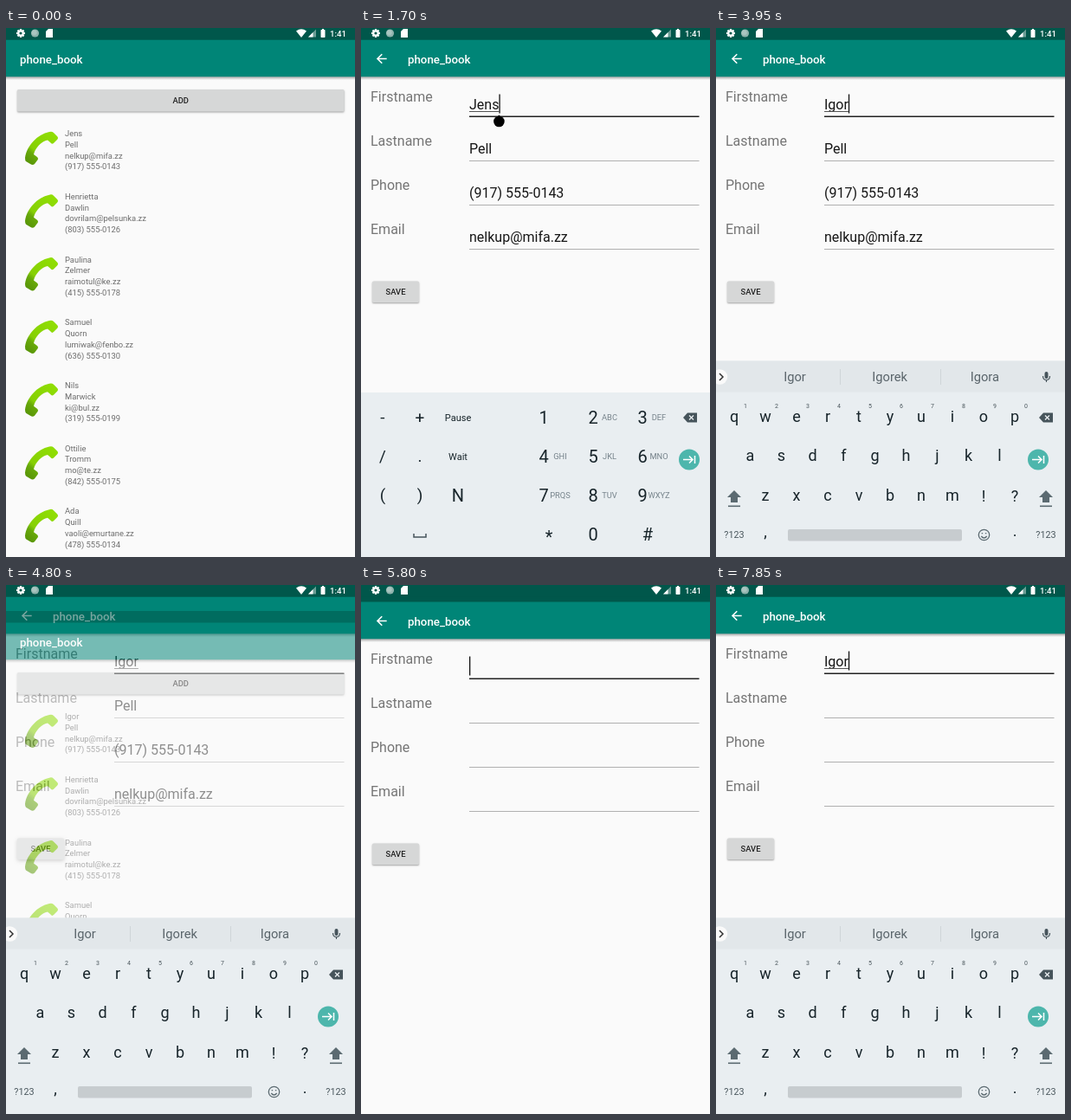
Write an HTML page with a canvas that moves like this. It is 403 by 611 pixels and loops after 8 s.

```html
<!DOCTYPE html>
<html lang="en">
<head>
<meta charset="utf-8">
<title>Phone book</title>
<style>
  html, body { margin: 0; width: 100%; height: 100%; overflow: hidden; background: #fafafa; }
  canvas { display: block; }
</style>
</head>
<body>
<canvas id="stage" width="403" height="611"></canvas>
<script>
const W = 403, H = 611, LOOP = 8000;
const stage = document.getElementById('stage').getContext('2d');
const layerCanvas = Object.assign(document.createElement('canvas'), { width: W, height: H });
const layer = layerCanvas.getContext('2d');
let c = stage;

const contacts = [
  ['Jens', 'Pell', 'nelkup@mifa.zz', '(917) 555-0143'],
  ['Henrietta', 'Dawlin', 'dovrilam@pelsunka.zz', '(803) 555-0126'],
  ['Paulina', 'Zelmer', 'raimotul@ke.zz', '(415) 555-0178'],
  ['Samuel', 'Quorn', 'lumiwak@fenbo.zz', '(636) 555-0130'],
  ['Nils', 'Marwick', 'ki@bul.zz', '(319) 555-0199'],
  ['Ottilie', 'Tromm', 'mo@te.zz', '(842) 555-0175'],
  ['Ada', 'Quill', 'vaoli@emurtane.zz', '(478) 555-0134']
];

// [start, text of the first field]
const edits = [
  [0, 'Jens'], [1950, 'Jen'], [2050, 'Je'], [2200, 'J'], [2350, ''],
  [2850, 'I'], [3650, 'Ig'], [3850, 'Igo'], [3950, 'Igor'],
  [5550, ''], [6650, 'I'], [6950, 'Ig'], [7350, 'Igo'], [7800, 'Igor']
];
const suggestions = {
  '': ['thanks', 'I', 'we'],
  Jens: ['Jens', 'Jensen', 'Jenseny'], Jen: ['Jen', 'Jens', 'Jenny'],
  Je: ['Je', 'Jet', 'Jeans'], J: ['J', 'Just', 'July'],
  I: ['I', 'in', 'is'], Ig: ['Ig', 'I', 'it'], Igo: ['Igo', 'I', 'it'],
  Igor: ['Igor', 'Igorek', 'Igora']
};
const caretOff = [[1450, 1600], [2600, 2800], [3050, 3300], [3500, 3650], [4150, 4400],
  [4600, 5000], [6350, 6550], [6850, 6950], [7150, 7350], [7600, 7800]];

const clamp = v => Math.max(0, Math.min(1, v));
const ease = (t, from, to) => 1 - (1 - clamp((t - from) / (to - from))) ** 2;
const within = (t, [a, b]) => t >= a && t < b;

function rect(x, y, w, h, color, r = 0) {
  c.fillStyle = color;
  c.beginPath();
  c.roundRect(x, y, w, h, r);
  c.fill();
}
function disc(x, y, r, color) {
  c.fillStyle = color;
  c.beginPath();
  c.arc(x, y, r, 0, 7);
  c.fill();
}
function text(s, x, y, size, color, align = 'left', weight = 400) {
  c.font = `${weight} ${size}px Roboto, sans-serif`;
  c.textAlign = align;
  c.fillStyle = color;
  c.fillText(s, x, y);
}
const key = (s, x, y, size = 18, color = '#17242a') => text(s, x, y + size * 0.33, size, color, 'center');
function shape(d, x, y, color, stroke = 0) {
  c.save();
  c.translate(x, y);
  const path = new Path2D(d);
  c.fillStyle = c.strokeStyle = color;
  c.lineWidth = stroke;
  stroke ? c.stroke(path) : c.fill(path);
  c.restore();
}

function button(label, x, y, w, h, pressed) {
  c.save();
  c.shadowColor = 'rgba(0,0,0,.35)';
  c.shadowBlur = pressed ? 4 : 2;
  c.shadowOffsetY = pressed ? 1.5 : 1;
  rect(x, y, w, h, pressed ? '#d3d4d4' : '#d6d7d7', 1.5);
  c.restore();
  text(label, x + w / 2, y + h / 2 + 3.4, 9.4, '#212121', 'center', 500);
}

function appWindow(titleX) {
  rect(0, 0, W, H, '#fafafa');
  const shadow = c.createLinearGradient(0, 56, 0, 60);
  shadow.addColorStop(0, 'rgba(0,0,0,.35)');
  shadow.addColorStop(1, 'rgba(0,0,0,0)');
  rect(0, 56, W, 4, shadow);
  rect(0, 0, W, 14, '#00574b');
  rect(0, 13.5, W, 42.8, '#008577');
  text('phone_book', titleX, 40.5, 13.3, '#fff', 'left', 500);
}

function handset(x, y) {
  const green = c.createLinearGradient(4, 38, 32, 4);
  green.addColorStop(0, '#569207');
  green.addColorStop(0.28, '#68a90a');
  green.addColorStop(0.4, '#86d003');
  green.addColorStop(1, '#8fdd04');
  shape('M1 31C3 17 15 4 29 1Q32 0 34 2L38 6Q40 8 38 10L34 14Q32 16 30 13L27 10.5C20 12 13 19 11 27L15 30Q17 32 15 34L12 38Q10 40 7 38L2 35Q1 34 1 31Z', x, y, green);
}

function listScreen(firstName, pressed) {
  appWindow(16);
  button('ADD', 13, 71, 377.5, 25.5, pressed);
  contacts.forEach((contact, i) => {
    const y = i * 72.7;
    handset(21, 119 + y);
    contact.forEach((line, j) =>
      text(i || j ? line : firstName, 68, 125.2 + y + j * 12.75, 9.4, '#6c6c6c'));
  });
}

function formScreen({ values, focus, caretAtEnd, caret, underline, handle, pressed }) {
  appWindow(54);
  shape('M29.7 35.5H19.2M24.3 30.2L19 35.5L24.3 40.8', 0, 0, '#fff', 1.6);
  ['Firstname', 'Lastname', 'Phone', 'Email'].forEach((label, i) => {
    const y = i * 51.1, active = i === focus;
    text(label, 11, 85 + y, 16, '#757575');
    text(values[i], 125, 94 + y, 16, '#161616');
    const width = c.measureText(values[i]).width;
    if (active) rect(125, 101.5 + y, 265.5, 1.6, '#222');
    else rect(125, Math.round(102 + y), 265.5, 1, '#b0b0b0');
    if (!i && underline) rect(125, 96, width, 1, '#555');
    if (!active) return;
    const x = 125 + (caretAtEnd ? width : 0);
    if (caret) rect(x, 76.5 + y, 1.3, 22, '#111');
    if (handle) {
      disc(x, 108, 6.3, '#000');
      shape('M0 0L5.2 5H-5.2Z', x, 100.5, '#000');
    }
  });
  button('SAVE', 13, 292.5, 54, 24.5, pressed);
}

function statusIcons() {
  rect(0, 0, W, 13.5, '#00574b');
  for (let i = 0; i < 4; i++) {
    c.save();
    c.translate(17, 6);
    c.rotate(i * Math.PI / 4);
    rect(-1.1, -5, 2.2, 10, '#fff');
    c.restore();
  }
  disc(17, 6, 3.8, '#fff');
  disc(17, 6, 1.6, '#00574b');
  disc(33.5, 6, 4.6, '#8fb3ad');
  disc(32.7, 5.2, 3, '#a9c5c0');
  shape('M3 0H8V10H0V3Z', 46, 1, '#fff');
  shape('M0 2.5Q6 -2 12 2.5L6 10Z', 335, 1, '#fff');
  shape('M9 0V9H0Z', 349, 1.5, '#6b9d95');
  shape('M5.5 3.5V9H0Z', 349, 1.5, '#fff');
  rect(363.5, 2, 5, 9, '#fff', 0.8);
  rect(365, 1, 2, 2, '#fff');
  text('1:41', 393, 9.8, 9.6, '#fff', 'right', 500);
}

function backspace(x) {
  shape('M-8 0L-3 -5.5H8V5.5H-3Z', x, 450, '#46545b');
  shape('M-1 -2.5L4 2.5M4 -2.5L-1 2.5', x, 450, '#e9eef1', 1.3);
}
function nextKey(x) {
  disc(x, 498.5, 12, '#4db6ac');
  shape('M-7 0H4M0 -4L4 0L0 4M6.5 -4.5V4.5', x, 498.5, '#fff', 1.5);
}

function numberPad() {
  rect(0, 421, W, 190, '#e9eef1');
  const rows = [450, 495, 540, 585];
  ['-+', '/.', '()'].forEach((pair, i) => [...pair].forEach((s, j) => key(s, 25 + j * 43, rows[i], 19)));
  key('Pause', 112, 450, 11);
  key('Wait', 112, 495, 11);
  key('N', 112, 540, 20);
  ['', 'ABC', 'DEF', 'GHI', 'JKL', 'MNO', 'PRQS', 'TUV', 'WXYZ'].forEach((letters, i) => {
    const x = 211 + i % 3 * 57, y = rows[i / 3 | 0];
    key(i + 1, x, y, 20);
    key(letters, x + 19, y, 9.3, '#75828a');
  });
  shape('M-7 -2V2H7V-2', 68, 586, '#46545b', 1.5);
  key('*', 217, 588, 20);
  key('0', 268, 585, 20);
  key('#', 331, 585, 20);
  backspace(380);
  nextKey(379);
}

function letterKeys(words) {
  rect(0, 384.5, W, 227, '#e9eef1');
  rect(0, 384.5, W, 36, '#e2e7ea');
  disc(4.5, 403, 8.7, '#fafafa');
  shape('M-2 -4L2 0L-2 4', 6, 403, '#333', 1.5);
  words.forEach((word, i) => key(word, 91 + i * 109.7, 403.5, 14.7, '#59646a'));
  rect(143, 394, 1, 18, '#cfd5d8');
  rect(259, 394, 1, 18, '#cfd5d8');
  rect(379.5, 397, 4, 8, '#46545b', 2);
  shape('M-4 0Q-4 4.5 0 4.5Q4 4.5 4 0M0 4.5V7', 381.5, 402, '#46545b', 1.2);
  [['qwertyuiop', 21, 449], ['asdfghjkl', 39.5, 494], ['zxcvbnm', 57, 540], ['!?', 309, 541.5]].forEach(([row, x, y]) =>
    [...row].forEach((s, i) => key(s, x + i * 36, y)));
  for (let i = 0; i < 10; i++) key((i + 1) % 10, 34 + i * 36, 436.5, 7, '#4a565c');
  backspace(381);
  nextKey(372);
  for (const x of [21, 381]) {
    shape('M0 -8L8 0H4V6H-4V0H-8Z', x, 542, '#5b6a71');
    rect(x - 7, 551.5, 14, 1.6, '#5b6a71');
    key('?123', x, 585.5, 10.8, '#4a575d');
  }
  key(',', 57, 582);
  key('.', 345, 581.5);
  rect(83, 579, 201, 13.5, '#c7cccf', 2);
  shape('M6.2 0A6.2 6.2 0 1 1 -6.2 0A6.2 6.2 0 1 1 6.2 0M-3.2 1.5Q0 5.5 3.2 1.5M-2.8 -1.8H-1.4M1.4 -1.8H2.8', 309.5, 585.5, '#5b6a71', 1.3);
}

// Puts a screen over the current one while it rises and fades in.
function enter(progress, draw) {
  if (progress <= 0) return;
  c = layer;
  draw();
  c = stage;
  c.globalAlpha = Math.min(1, progress * 1.35);
  c.drawImage(layerCanvas, 0, Math.round((1 - progress) * 49));
  c.globalAlpha = 1;
}

function slideUp(distance, draw) {
  c.save();
  c.translate(0, distance);
  draw();
  c.restore();
}

function render(t) {
  const name = edits.filter(([start]) => start <= t).pop()[1];
  const adding = t >= 5550;
  const onPhone = within(t, [1150, 1600]);
  const form = () => formScreen({
    values: adding ? [name, '', '', ''] : [name, contacts[0][1], contacts[0][3], contacts[0][2]],
    focus: onPhone ? 2 : 0,
    caretAtEnd: t >= 1600,
    caret: !caretOff.some(span => within(t, span)),
    underline: t >= 1650,
    handle: within(t, [1650, 1950]),
    pressed: within(t, [4600, 5000])
  });

  if (t < 4600) {
    listScreen(contacts[0][0], false);
    enter(ease(t, 530, 750), form);
  } else if (!adding) {
    form();
    enter(ease(t, 4773, 4900), () => listScreen('Igor', false));
  } else {
    listScreen('Igor', true);
    enter(ease(t, 5660, 5880), form);
  }
  statusIcons();

  const letters = () => letterKeys(suggestions[name]);
  if (within(t, [1150, 1800])) slideUp(190 * (1 - ease(t, 1130, 1300)), numberPad);
  else if (within(t, [1800, 4900])) slideUp(227 * clamp((t - 4815) / 85) ** 2, letters);
  else if (t >= 5930) slideUp(227 * (1 - ease(t, 5930, 6140)), letters);
}

function tick() {
  render(performance.now() % LOOP);
  requestAnimationFrame(tick);
}
tick();
</script>
</body>
</html>
```
